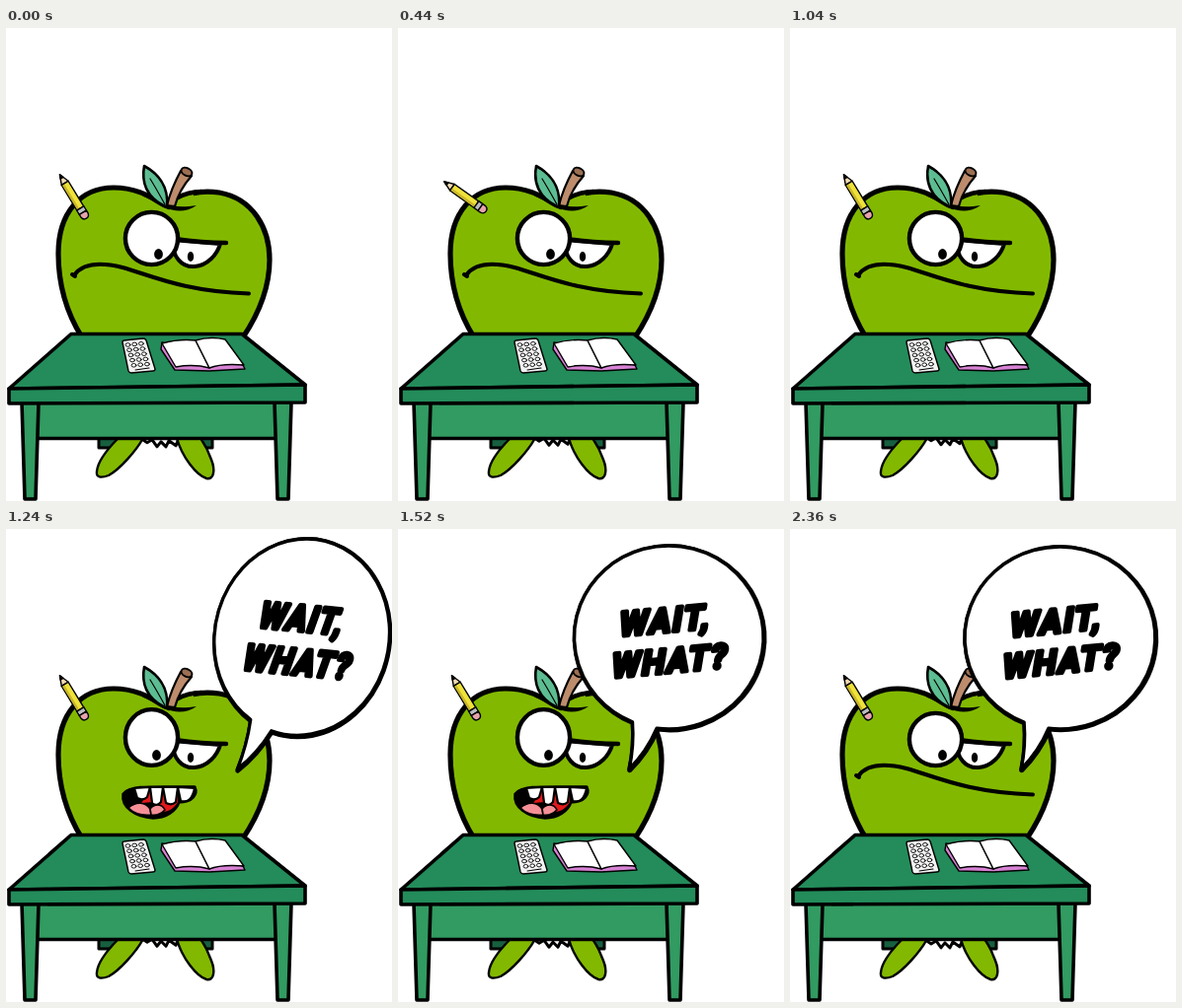
Animation of 391 by 480 pixels, one loop 2.4 s. Source, as an HTML page:

```html
<!DOCTYPE html>
<html lang="en">
<head>
<meta charset="utf-8">
<title>Wait, what?</title>
<style>
html, body { margin: 0; width: 100%; height: 100%; overflow: hidden; background: #fff; }
svg { display: block; width: 391px; height: 480px; }
svg * { stroke-linejoin: round; stroke-linecap: round; }
.ink { stroke: #000; }
.line { stroke: #000; fill: none; }
text { font: italic 700 34px Roboto, "Open Sans", sans-serif; letter-spacing: 2px; text-anchor: middle; stroke: #000; stroke-width: 4.2; }
</style>
</head>
<body>
<svg viewBox="0 0 391 480">
  <defs>
    <path id="balloon" d="M262 202.3A96.5 92.5 0 1 0 237 196.1Q239 220 234 244Q252 226 262 202.3Z"/>
  </defs>

  <!-- chair and feet -->
  <path class="ink" fill="#17603f" stroke-width="3" d="M94 414V426H209V414Z"/>
  <path fill="#fff" d="M112 417H200V430H112Z"/>
  <path id="frill" class="line" stroke-width="3" d="M137 417L143 421L148 418L153 425L157 420L162 425L165 419L172 424L175 417"/>
  <g class="ink" fill="#82b900" stroke-width="2.4">
    <path d="M92 450C93 438 105 425 114 416H139C132 429 115 448 104 454C96 457 91 456 92 450Z"/>
    <path d="M173 416C178 435 193 454 203 457C211 459 212 448 208 438C205 429 201 422 197 416Z"/>
  </g>

  <!-- apple -->
  <path class="ink" fill="#82b900" stroke-width="5.2" d="M77 314C62 290 53 260 53 229C53 188 75 162 109 162C134 162 149 173 165 181L173 173C188 166 203 165 216 167C250 173 267 203 267 235C267 266 254 293 240 314Z"/>
  <path fill="#82b900" d="M159 185L171 171L190 168V184Z"/>
  <path class="line" stroke-width="4.4" d="M140 169C150 173 156 179 165 182M172 173C181 168 190 166 198 166"/>
  <path d="M158 177C170 182 180 182 193 180C183 187 172 187 160 182Z"/>
  <path class="ink" fill="#bd8c6c" stroke-width="2.2" d="M163 180C166 168 171 156 177 145L188 150C180 159 174 169 171 181Z"/>
  <ellipse class="ink" fill="#9c6f53" stroke-width="2" cx="183" cy="146" rx="5.8" ry="3.9" transform="rotate(27 183 146)"/>
  <path class="ink" fill="#5dbd92" stroke-width="2.6" d="M161 181C142 172 137 156 140 140C153 147 165 160 163 181Z"/>
  <path class="line" stroke-width="1.2" d="M146 153C151 161 156 170 161 179"/>

  <!-- eyes -->
  <path class="ink" fill="#fff" stroke-width="4" d="M168 215C169 233 178 243 191 242C204 241 214 230 217 219Z"/>
  <path class="line" stroke-width="4.4" d="M171 214C185 216 205 218 223 218"/>
  <ellipse cx="187" cy="232" rx="3.2" ry="5"/>
  <ellipse id="eye" class="ink" fill="#fff" stroke-width="4.4" cx="147.5" rx="26.6"/>
  <ellipse id="pupil" cy="229.5" rx="4.4" ry="5.4"/>

  <!-- mouths -->
  <g id="shut">
    <path class="line" stroke-width="4" d="M69 251C78 238 98 238 118 243C147 251 178 267 246 269.5M67 250L70 252"/>
  </g>
  <g id="wide">
    <path class="ink" stroke-width="3.4" d="M119 269C126 260 148 262 191 262C194 269 189 277 175 277C172 286 162 293 149 293C131 292 117 282 119 269Z"/>
    <path fill="#e3191b" d="M146 266H174V277C170 284 164 287 158 287L150 277L137 278Z"/>
    <g class="ink" fill="#f58f96" stroke-width="1.6">
      <path d="M124 283C132 276 141 277 146 284L147 290C137 291 129 288 124 283Z"/>
      <path d="M146 284C151 278 158 279 161 285C157 289 152 291 147 290Z"/>
    </g>
    <g class="ink" fill="#fff" stroke-width="2.2">
      <path d="M130 263L133 273Q139 276 143 272L146 262Z"/>
      <path d="M146 262L148 278Q153 282 157 277L159 262Z"/>
      <path d="M159 262L162 278Q168 281 172 277L174 262Z"/>
      <path d="M174 262L177 276Q188 279 191 263Z"/>
    </g>
  </g>
  <g id="snarl">
    <path class="ink" stroke-width="3.4" d="M115 265C119 255 137 257 183 263C185 271 181 276 171 274C164 276 155 274 151 276L159 283C146 279 140 286 128 286C113 286 109 276 115 265Z"/>
    <path fill="#e3191b" d="M117 267L145 264L153 272L145 281L131 278L115 280Z"/>
    <path class="ink" fill="#f58f96" stroke-width="1.6" d="M113 281C121 274 134 275 142 282C133 287 119 287 113 281Z"/>
    <g class="ink" fill="#fff" stroke-width="2">
      <path d="M118 259L118 268Q122 272 126 268L128 258Z"/>
      <path d="M128 258L129 270Q137 273 143 269L145 259Z"/>
      <path d="M145 259L147 274Q151 277 155 274L158 261Z"/>
      <path d="M158 261L160 274Q164 278 168 274L170 262Z"/>
      <path d="M170 262L172 274Q182 277 183 263Z"/>
    </g>
  </g>

  <!-- desk -->
  <g class="ink" stroke-width="3.6">
    <path fill="#319b61" d="M31 380H274V416.5H31Z"/>
    <path fill="#319b61" d="M16 380H33L30 478H19Z"/>
    <path fill="#319b61" d="M272 380H289L286 478H275Z"/>
    <g fill="#238c5a">
      <path d="M66 310.5H239L303 362L3 366Z"/>
      <path d="M3 366L303 362V380L3 381Z"/>
    </g>
  </g>

  <!-- calculator and book -->
  <path class="ink" fill="#f3f3f3" stroke-width="1.4" d="M118 319Q118 317 120 317L139 315Q141 315 142 317L151 346Q151 348 149 348L127 350Q125 350 124 348Z"/>
  <g id="keys" class="ink" fill="#fff" stroke-width=".9"></g>
  <path class="line" stroke-width="1.1" d="M131 347L145 345"/>
  <path class="ink" fill="#d883d5" stroke-width="1.4" d="M158 319L157 326L171 347L206 348L242 346L240 342Z"/>
  <path class="ink" fill="#fff" stroke-width="1.4" d="M158 320C169 317 183 316 192 317L206 345C195 342 183 342 172 344Z"/>
  <path class="ink" fill="#fff" stroke-width="1.4" d="M192 317C202 314 213 314 222 316L241 342C229 341 216 341 206 345Z"/>

  <!-- pencil, drawn along its axis -->
  <g id="pencil" class="ink" stroke-width="1.4">
    <path fill="#f3d9b0" d="M-26 0L-16 -4V4Z"/>
    <path fill="#000" d="M-26 0L-22 -1.6V1.6Z"/>
    <path fill="#efe23a" d="M-16 -4H14V4H-16Z"/>
    <path fill="#c9b62a" stroke="none" d="M-15 1H13V3.4H-15Z"/>
    <path fill="#b9bcc0" d="M14 -4.2H19V4.2H14Z"/>
    <path fill="#e6a3ae" d="M19 -4.2H22Q26 -3.6 26 0Q26 3.6 22 4.2H19Z"/>
  </g>

  <g id="bubble">
    <use href="#balloon" class="ink" stroke-width="5" transform="translate(.8 .8)"/>
    <use href="#balloon" class="ink" fill="#fff" stroke-width="3.6"/>
    <g transform="translate(273 112) rotate(-5.5) skewX(-5)">
      <text x="-3" y="-7">WAIT,</text>
      <text x="2" y="34">WHAT?</text>
    </g>
  </g>
</svg>
<script>
const LOOP = 2400, STEP = 40, POP = 1160, FULL = 1240;
const TIP = [234, 245];
const $ = id => document.getElementById(id);
const set = (id, attrs) => {
  for (const name in attrs) $(id).setAttribute(name, attrs[name]);
};
const show = (id, on) => set(id, { visibility: on ? "visible" : "hidden" });

for (let row = 0; row < 5; row++) {
  for (let col = 0; col < 3; col++) {
    const x = 123.5 + col * 6.7 + row * 1.5, y = 321.5 - col * .6 + row * 5.2;
    $("keys").insertAdjacentHTML("beforeend", `<ellipse cx="${x}" cy="${y}" rx="2.4" ry="1.8"/>`);
  }
}

// The bubble pops up from its tail, swings upright and wobbles to rest.
function drawBubble(t) {
  const u = (t - FULL) / 160;
  const angle = 12 * Math.exp(-1.84 * u);
  const squash = .085 * Math.exp(-1.3 * u) * Math.cos(Math.PI * u);
  const size = Math.min(1, .4 + .3 * (t - POP) / STEP);
  set("bubble", {
    transform: `translate(${TIP}) rotate(${angle}) ` +
      `scale(${size * (1 - squash)} ${size * (1 + squash)}) translate(${TIP.map(v => -v)})`
  });
}

function mouthAt(t) {
  if (t < POP || t >= 1640) return "shut";
  return Math.floor((t - POP) / 160) % 2 ? "snarl" : "wide";
}

function draw(now) {
  const t = Math.floor(now % LOOP / STEP) * STEP;
  const swing = t < 1040 ? (1 - Math.cos(t / 1040 * 2 * Math.PI)) / 2 : 0;
  set("pencil", { transform: `translate(68 171) rotate(${58.7 - 24.7 * swing})` });

  const lift = -1 - 1.4 * Math.cos((t - 840) / LOOP * 2 * Math.PI);
  set("frill", { transform: `translate(0 ${lift})` });

  const mouth = mouthAt(t), wide = mouth === "wide";
  ["shut", "wide", "snarl"].forEach(id => show(id, id === mouth));
  set("eye", { cy: wide ? 211.5 : 213.5, ry: wide ? 28.4 : 26.6 });
  set("pupil", { cx: mouth === "shut" ? 154.5 : 152.5 });

  show("bubble", t >= POP);
  if (t >= POP) drawBubble(t);
}

function tick() {
  draw(performance.now());
  requestAnimationFrame(tick);
}
tick();
</script>
</body>
</html>
```
